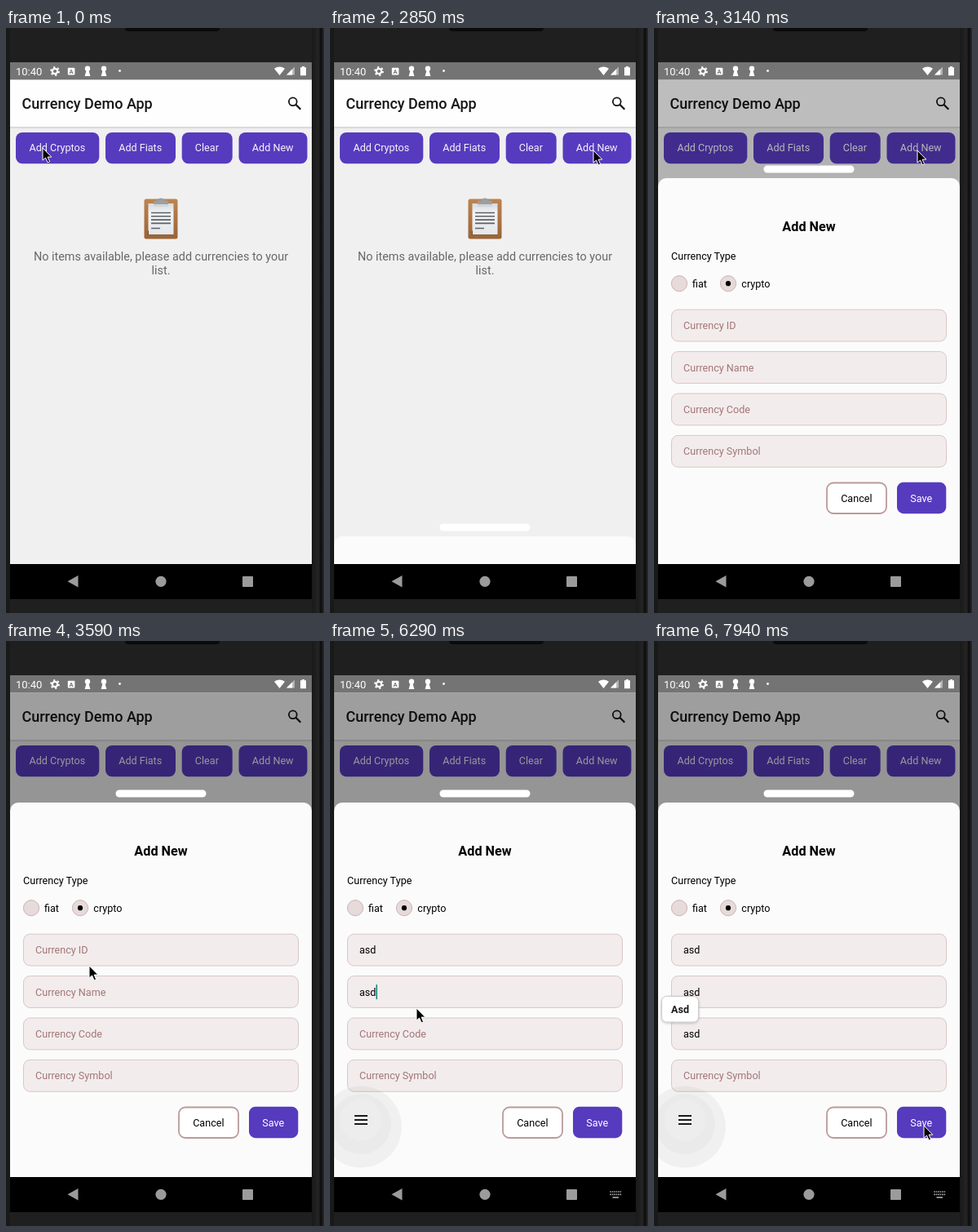
These frames come from a looping animation (390x717 px, 8000 ms). An HTML page:

```html
<!DOCTYPE html>
<html lang="en">
<head>
<meta charset="utf-8">
<title>Currency Demo App</title>
<style>
html, body { margin: 0; width: 100%; height: 100%; overflow: hidden; background: #1f1f1f; }
svg { display: block; width: 390px; height: 717px; font: 12.6px Roboto, sans-serif; }
.mid { text-anchor: middle; }
.hint { fill: #a27678; }
</style>
</head>
<body>
<svg id="stage" viewBox="0 0 390 717" xmlns="http://www.w3.org/2000/svg">
  <defs>
    <clipPath id="app"><rect x="5" y="63.5" width="370" height="593.5"/></clipPath>
    <linearGradient id="bezel" x1="0" x2="1" y1="0" y2="0">
      <stop offset="0" stop-color="#191919"/><stop offset=".55" stop-color="#242424"/>
      <stop offset=".75" stop-color="#0c0c0c"/><stop offset="1" stop-color="#2b2b2b"/>
    </linearGradient>
    <linearGradient id="drop" x1="0" x2="0" y1="0" y2="1">
      <stop offset="0" stop-color="#cfcfcf"/><stop offset="1" stop-color="#f0f0f0"/>
    </linearGradient>
    <linearGradient id="paper" x1="0" x2="0" y1="0" y2="1">
      <stop offset="0" stop-color="#d5d9df"/><stop offset=".3" stop-color="#f2f4f6"/><stop offset="1" stop-color="#e3e6ea"/>
    </linearGradient>
    <linearGradient id="wood" x1="0" x2="0" y1="0" y2="1">
      <stop offset="0" stop-color="#bd8450"/><stop offset="1" stop-color="#9a6335"/>
    </linearGradient>
    <filter id="soft" x="-30%" y="-30%" width="160%" height="170%">
      <feDropShadow dx="0" dy="1" stdDeviation="1.5" flood-opacity=".25"/>
    </filter>
  </defs>

  <!-- Phone body -->
  <rect width="390" height="717" fill="#1f1f1f"/>
  <rect x="375" width="15" height="717" fill="url(#bezel)"/>
  <rect width="5" height="717" fill="#191919"/>
  <rect x="146" y="-6" width="116" height="10" rx="4" fill="#0b0b0b"/>

  <!-- Status bar -->
  <rect x="5" y="42" width="370" height="21.5" fill="#747474"/>
  <g fill="#fff">
    <text x="12" y="57.5" font-size="13">10:40</text>
    <circle cx="60" cy="53" r="3.2" fill="none" stroke="#fff" stroke-width="2.2"/>
    <circle cx="60" cy="53" r="5" fill="none" stroke="#fff" stroke-width="1.8" stroke-dasharray="2.2 3.036"/>
    <rect x="75.8" y="48.8" width="8.6" height="8.6" rx="1"/>
    <text class="mid" x="80.1" y="56" font-size="7.5" font-weight="700" fill="#747474">A</text>
    <g id="keyhole"><circle cx="100" cy="49.8" r="3.2"/><path d="M98.8 51h2.4l2.2 8h-6.8z"/></g>
    <use href="#keyhole" x="20"/>
    <circle cx="139.5" cy="52.5" r="1.4"/>
    <path d="M335.5 58l-6.5-8.2q6.5-4.8 13 0z"/>
    <path d="M354 47.5v10h-10z" fill="#b5b5b5"/><path d="M351.2 50.3v7.2H344z"/>
    <path d="M361 48.2h2v-1.2h3v1.2h2v10h-7z"/>
  </g>

  <!-- App -->
  <g clip-path="url(#app)">
    <rect x="5" y="63" width="370" height="595" fill="#f0f0f0"/>
    <rect x="5" y="63" width="370" height="58.5" fill="#fefefe"/>
    <rect x="5" y="121" width="370" height="3" fill="url(#drop)"/>
    <text x="19.5" y="99" font-size="18" font-weight="500" fill="#151515">Currency Demo App</text>
    <g fill="none" stroke="#151515" stroke-width="1.8">
      <circle cx="351.8" cy="90.3" r="4.9"/><path d="M355.3 93.8l6 6" stroke-width="2.3"/>
    </g>
    <g id="actions"></g>

    <rect x="169.5" y="209.5" width="41" height="49" rx="2.5" fill="url(#wood)"/>
    <rect x="174.5" y="215" width="31" height="38.5" fill="url(#paper)"/>
    <path d="M174.5 253.5v-5l0 5h31" fill="none" stroke="#74481f" stroke-width=".7"/>
    <path d="M181 219v-6q0-1.5 2-1.5h2.5q1-3 4.5-3t4.5 3h2.5q2 0 2 1.5v6z" fill="#9b9ea2"/>
    <path d="M181 219v-3h18v3z" fill="#d3d5d8"/>
    <path d="M178 226.5h24M178 230.8h24M178 235.1h24M178 239.4h24M178 245.5h11" stroke="#5d6167" stroke-width="1.6"/>
    <g class="mid" font-size="14.4" fill="#686868">
      <text x="190" y="284.8">No items available, please add currencies to your</text>
      <text x="190" y="301.5">list.</text>
    </g>

    <rect id="dim" x="5" y="63" width="370" height="595"/>

    <g id="sheet">
      <rect x="134.5" y="-15.5" width="111" height="9" rx="4.5" fill="#fff"/>
      <rect x="5" width="370" height="700" rx="10" fill="#fbfbfb"/>
      <text class="mid" x="190" y="65" font-size="16.2" font-weight="700">Add New</text>
      <text x="21" y="99.5">Currency Type</text>
      <g fill="#e6dada" stroke="#ccb5b5">
        <circle cx="31" cy="129.2" r="9.6"/><circle cx="91" cy="129.2" r="9.6"/>
      </g>
      <circle cx="91" cy="129.2" r="3.1"/>
      <text x="47" y="133.8">fiat</text>
      <text x="107.3" y="133.8">crypto</text>
      <g id="form"></g>
      <rect x="212" y="373.5" width="73" height="37.5" rx="8" fill="#fff" stroke="#bb9a9b" stroke-width="1.8"/>
      <text class="mid" x="248.3" y="396.5">Cancel</text>
      <rect x="298" y="372.7" width="60.3" height="38.5" rx="8" fill="#573bbe"/>
      <text class="mid" x="327.7" y="396.5" fill="#fff">Save</text>
    </g>

    <g id="bubble">
      <circle id="halo" cx="38" cy="595.5" r="50" fill-opacity=".045"/>
      <circle cx="38" cy="592" r="37" fill-opacity=".025"/>
      <circle cx="38" cy="587" r="25.5" fill="#ededed"/>
      <path d="M30 582h16M30 587h16M30 592h16" stroke="#1b1b1b" stroke-width="2"/>
    </g>

    <g id="tip">
      <rect x="9.5" y="435.5" width="45" height="31.5" rx="6" fill="#fff" stroke="#cbcbcb" filter="url(#soft)"/>
      <text class="mid" x="32" y="456" font-weight="700" fill="#1a1a1a">Asd</text>
    </g>
  </g>

  <!-- Navigation bar -->
  <rect x="5" y="657" width="370" height="43" fill="#000"/>
  <g fill="#9b9b9b">
    <path d="M75.5 678.3l13-7.3v14.6z"/>
    <circle cx="190" cy="678.3" r="6.6"/>
    <rect x="290" y="672" width="13" height="13" rx=".8"/>
  </g>
  <g id="keys" fill="none" stroke="#a5a5a5" stroke-width="1.7">
    <path d="M343.3 675h14M343.3 678.4h14" stroke-dasharray="1.6 .85"/>
    <path d="M346.5 682h7.5"/>
  </g>

  <path id="mouse" d="M0 0V15.2L3.5 12L6.1 17.8L8.6 16.7L6.1 11.1H10.8Z" fill="#000" stroke="#fff" stroke-width="1" stroke-linejoin="round"/>
</svg>
<script>
const $ = id => document.getElementById(id);
const LOOP = 8000, TICK = 150;

// Time, x, y of the pointer
const pointerPath = [
  [0, 45, 147], [150, 66, 150], [600, 346, 152], [1050, 82, 148], [1200, 82, 148],
  [1350, 79, 152], [1500, 110, 156], [1800, 292, 153], [1950, 328, 149], [2250, 328, 149],
  [2400, 325, 149], [2550, 323, 150], [3290, 323, 150], [3440, 190, 320], [3590, 102, 398],
  [3890, 98, 381], [5390, 98, 381], [5690, 104, 429], [6140, 105, 432], [6290, 106, 450],
  [6440, 111, 480], [7190, 112, 481], [7340, 190, 522], [7490, 299, 578], [7640, 321, 590],
  [7790, 330, 593], [7940, 331, 594]
];
const sheetPath = [[2700, 690], [2850, 623], [2990, 330], [3140, 184], [3290, 195], [3440, 199], [3590, 198]];
const dimPath = [[2850, 0], [3140, .26], [3290, .36], [3440, .38]];

const actions = [["Add Cryptos", 12, 102.3], ["Add Fiats", 122, 86], ["Clear", 215.7, 62], ["Add New", 285.5, 84]];
$("actions").innerHTML = actions.map(([label, x, w]) =>
  `<rect x="${x}" y="128" width="${w}" height="38.3" rx="8" fill="#573bbe"/>
   <text class="mid" x="${x + w / 2 - .3}" y="151.3" fill="#fff" fill-opacity=".94">${label}</text>`).join("");

const fields = [
  { hint: "Currency ID", focus: 4190, blur: 5690, keys: [5090, 5240] },
  { hint: "Currency Name", focus: 5690, blur: 6590, keys: [5990, 6140] },
  { hint: "Currency Code", focus: 6590, blur: LOOP, keys: [6890, 7040] },
  { hint: "Currency Symbol", focus: LOOP, blur: LOOP, keys: [] }
];
$("form").innerHTML = fields.map((f, i) => {
  const y = 161.2 + i * 51.4;
  return `<rect x="21.5" y="${y}" width="337" height="38.8" rx="8" fill="#f3ecec" stroke="#d9c6c6"/>
    <text x="36" y="${y + 24}"></text><rect y="${y + 10.5}" width="1.5" height="18" fill="#128577"/>`;
}).join("");
const labels = document.querySelectorAll("#form text");
const carets = document.querySelectorAll("#form text + rect");

// Values of a keyed path at time t
function along(path, t) {
  const n = path.findIndex(p => p[0] > t);
  if (n === 0) return path[0].slice(1);
  if (n < 0) return path[path.length - 1].slice(1);
  const a = path[n - 1], b = path[n], k = (t - a[0]) / (b[0] - a[0]);
  return a.slice(1).map((v, i) => v + (b[i + 1] - v) * k);
}

// The screen refreshes in even ticks, one of them a little short
const refresh = t => t < 2990 ? Math.floor(t / TICK) * TICK : 2990 + Math.floor((t - 2990) / TICK) * TICK;

const show = (el, on) => el.setAttribute("visibility", on ? "visible" : "hidden");

function drawField(f, i, t) {
  const pressed = f.keys.filter(k => k <= t);
  const value = ["", "a", "asd"][pressed.length];
  labels[i].textContent = value || f.hint;
  labels[i].setAttribute("class", value ? "" : "hint");
  const since = pressed.length ? pressed[pressed.length - 1] : f.focus;
  const blinkOn = Math.floor((t - since) / 500) % 2 === 0;
  carets[i].setAttribute("x", 36 + [0, 7, 20.5][pressed.length]);
  show(carets[i], t >= f.focus && t < f.blur && blinkOn);
}

function draw(time) {
  const t = refresh(time);
  const [x, y] = along(pointerPath, t);
  $("mouse").setAttribute("transform", `translate(${x} ${y})`);
  $("sheet").setAttribute("transform", `translate(0 ${along(sheetPath, t)[0]})`);
  $("dim").setAttribute("opacity", along(dimPath, t)[0]);
  fields.forEach((f, i) => drawField(f, i, t));
  show($("keys"), t >= 4190);
  $("bubble").setAttribute("opacity", along([[4190, 0], [4640, 1]], t)[0]);
  $("halo").setAttribute("r", along([[4490, 38], [4790, 50]], t)[0]);
  show($("tip"), t >= 7190);
}

const start = performance.now();
function loop(now) {
  draw(Math.max(0, now - start) % LOOP);
  requestAnimationFrame(loop);
}
draw(0);
requestAnimationFrame(loop);
</script>
</body>
</html>
```
